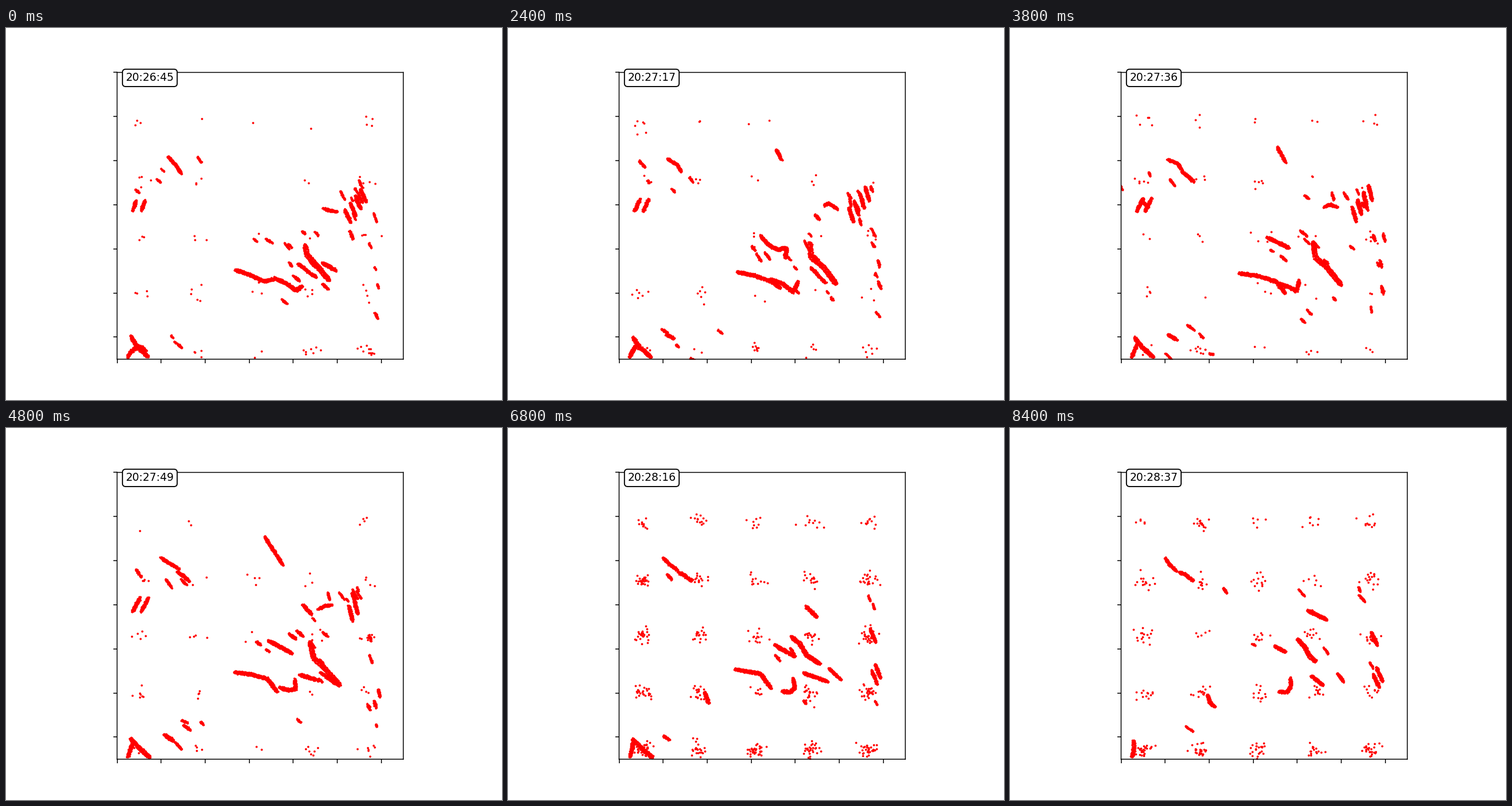
Animation, 864 px wide and 648 px high, one loop 8.6 s. Source, as a matplotlib script:

```python
import numpy as np
import matplotlib.pyplot as plt
from matplotlib.animation import FuncAnimation

FRAMES, INTERVAL = 43, 200
WIDTH, HEIGHT = 864, 648
LEFT, RIGHT, TOP, BOTTOM = 193.5, 692.1, 77.4, 576.9
QUIET_END = 28  # ridges and streaks thin out here, clutter takes over

ridges = []


def ridge(first, last, width, *poses):
    """A drifting ridge; its poses (x, y, x, y, ...) are spread evenly over its life."""
    ridges.append((first, last, width, [np.reshape(p, (-1, 2)) for p in poses]))


# upper left
ridge(0, 20, 7, (282, 224, 297, 240, 305, 254), (274, 229, 292, 236, 300, 248))
ridge(21, 42, 7, (269, 225, 284, 234, 304, 245), (270, 226, 278, 238, 290, 249))
ridge(18, 42, 7.5, (299, 250, 310, 258, 320, 268), (294, 251, 304, 254, 319, 266))
for dx in (0, 15):
    ridge(0, QUIET_END, 7.5, (220 + dx, 318, 227 + dx, 300), (220 + dx, 320, 234 + dx, 294))

# long ridge across the middle
ridge(0, 38, 8, (399, 421, 425, 430, 449, 441, 467, 437),
      (398, 427, 430, 431, 463, 441, 479, 462),
      (394, 418, 412, 422, 433, 424, 453, 452))
ridge(0, 42, 8, (467, 435, 490, 446, 505, 457, 516, 449),
      (455, 437, 475, 444, 495, 460, 503, 440),
      (484, 457, 498, 461, 507, 453, 503, 436),
      (467, 459, 482, 460, 489, 450, 488, 434))

# centre
ridge(4, 15, 8, (439, 361, 453, 377, 470, 386, 485, 382, 483, 401))
ridge(16, 42, 8, (441, 361, 463, 370, 478, 377), (465, 375, 490, 390, 512, 403),
      (461, 380, 470, 385, 480, 390))
ridge(10, 26, 7, (466, 212, 476, 229), (468, 210, 480, 234), (444, 182, 483, 240))
ridge(0, QUIET_END, 10, (520, 377, 524, 395, 540, 412, 563, 440),
      (526, 372, 528, 400, 550, 416, 573, 447),
      (530, 371, 538, 400, 553, 415, 585, 450))
ridge(29, 42, 9, (488, 360, 504, 371, 520, 395, 550, 413),
      (500, 367, 514, 382, 521, 397, 533, 407))
ridge(0, 10, 8, (550, 409, 563, 415, 575, 423), (530, 383, 550, 408, 577, 422))
ridge(0, 14, 7, (508, 410, 538, 433), (530, 418, 556, 446))
ridge(20, 42, 8, (510, 432, 538, 440), (510, 425, 562, 439), (524, 431, 545, 448))
ridge(20, 42, 7, (543, 431, 572, 451), (554, 415, 580, 437), (570, 427, 581, 442))
ridge(0, 27, 7, (552, 314, 565, 318, 577, 320), (550, 309, 557, 303, 574, 315),
      (541, 318, 553, 312, 566, 306))
ridge(20, 42, 8, (516, 308, 532, 323), (518, 307, 533, 328), (518, 317, 552, 334))

# steep parallel ridges on the right
for i in range(4):
    x, y = 590 + 9 * i, 316 - 12 * i
    ridge(0, QUIET_END - 6 * (i > 1), 7.5, (x, y, x + 10, y + 23), (x + 8, y - 8, x + 14, y + 20))
ridge(5, QUIET_END, 7, (643, 433, 648, 446), (649, 460, 652, 473))
for x, y in ((629, 350), (638, 412), (632, 423)):
    ridge(29, 42, 7.5, (x + 2, y - 5, x + 11, y + 20), (x, y + 5, x + 11, y + 29))

# bottom left
ridge(0, 38, 8.5, (217, 536, 227, 554, 248, 573), (216, 542, 235, 560, 252, 574))
ridge(0, 42, 8, (226, 556, 218, 563, 211, 574), (215, 544, 216, 556, 212, 573))
ridge(5, QUIET_END, 8, (275, 534, 288, 538), (274, 533, 293, 547))
ridge(29, 42, 8, (341, 456, 344, 466, 346, 475), (344, 464, 348, 478, 357, 486))

# x, y, spread x, spread y, direction in degrees, number of brief streaks
ZONES = [(610, 305, 13, 20, 65, 8), (525, 370, 25, 50, 45, 9), (642, 450, 6, 60, 65, 5),
         (265, 275, 35, 18, 50, 4), (305, 540, 25, 14, 40, 4), (450, 385, 20, 12, 40, 3)]

CELL_X, CELL_Y = (234, 332, 432, 528, 628), (165, 265, 363, 461, 560)
CLUTTER = np.outer((12, 18, 18, 24, 32), (1.2, 1, 0.8, 0.9, 1.2))


def resample(path, count):
    steps = np.hypot(*np.diff(path, axis=0).T)
    s = np.concatenate([[0], np.cumsum(steps)])
    t = np.linspace(0, s[-1], count)
    return np.column_stack([np.interp(t, s, path[:, 0]), np.interp(t, s, path[:, 1])])


def pose_at(poses, u):
    """Blend between evenly spaced poses, u from 0 to 1."""
    if len(poses) == 1:
        return poses[0]
    i = min(int(u * (len(poses) - 1)), len(poses) - 2)
    f = u * (len(poses) - 1) - i
    return poses[i] * (1 - f) + poses[i + 1] * f


def fill(width, path, rng):
    """Cover a ridge with three rows of slightly scattered dots, tapered at the ends."""
    length = np.hypot(*np.diff(path, axis=0).T).sum()
    mid = resample(path, max(3, int(length / 1.4)))
    d = np.gradient(mid, axis=0)
    d /= np.hypot(d[:, 0], d[:, 1])[:, None]
    t = np.linspace(0, 1, len(mid))
    taper = np.clip(np.minimum(t, 1 - t) * length / 7 + 0.45, 0, 1)
    half = max(0, width - 3.75) / 2 * taper
    normal = np.column_stack([-d[:, 1], d[:, 0]]) * half[:, None]
    rows = np.vstack([mid + normal * r for r in (-1, 0, 1)])
    return rows + rng.normal(0, 0.4, rows.shape)


def streaks(n, rng):
    """Short streaks that stay for eight frames and then appear elsewhere."""
    for z, (x, y, sx, sy, angle, count) in enumerate(ZONES):
        if n > QUIET_END:
            count //= 3
        for i in range(count):
            life = np.random.default_rng((z, i, (n + 3 * i) // 8))
            centre = life.normal((x, y), (sx, sy))
            a = np.radians(life.normal(angle, 8))
            arm = life.uniform(2, 8) * np.array([np.cos(a), np.sin(a)])
            yield fill(life.uniform(4.5, 7), np.array([centre - arm, centre + arm]), rng)


def clutter(n, rng):
    """Noise around a regular grid of cells, growing late in the loop."""
    level = np.interp(n, (24, 34, 42), (0.15, 1, 0.65))
    for y, row in zip(CELL_Y, rng.poisson(CLUTTER * level)):
        for x, count in zip(CELL_X, row):
            yield rng.normal((x, y), (8, 6.5), (count, 2))


def scene(n):
    rng = np.random.default_rng(n)
    parts = [fill(width, pose_at(poses, (n - first) / (last - first)), rng)
             for first, last, width, poses in ridges if first <= n <= last]
    return np.vstack([*parts, *streaks(n, rng), *clutter(n, rng)])


fig = plt.figure(figsize=(6.4, 4.8), dpi=135, facecolor="white")
ax = fig.add_axes([LEFT / WIDTH, 1 - BOTTOM / HEIGHT,
                   (RIGHT - LEFT) / WIDTH, (BOTTOM - TOP) / HEIGHT])
ax.set_xlim(LEFT, RIGHT)
ax.set_ylim(BOTTOM, TOP)
ticks = np.arange(7) / 6.5
ax.set_xticks(LEFT + ticks * (RIGHT - LEFT), labels=[""] * 7)
ax.set_yticks(TOP + ticks * (BOTTOM - TOP), labels=[""] * 7)
for edge in (*ax.spines.values(), *ax.get_xticklines(), *ax.get_yticklines()):
    edge.set_snap(False)

echo, = ax.plot([], [], "o", color="red", markersize=1)
clock = ax.text(0.03, 1, "", transform=ax.transAxes, va="top", fontsize=10,
                family="DejaVu Sans",
                bbox=dict(boxstyle="round", facecolor="white", edgecolor="black"))


def draw(n):
    echo.set_data(*scene(n).T)
    minute, second = divmod(26 * 60 + 45 + round(n * 8 / 3), 60)
    clock.set_text(f"20:{minute:02d}:{second:02d}")
    return echo, clock


anim = FuncAnimation(fig, draw, frames=FRAMES, interval=INTERVAL, repeat=True)
plt.show()
```
